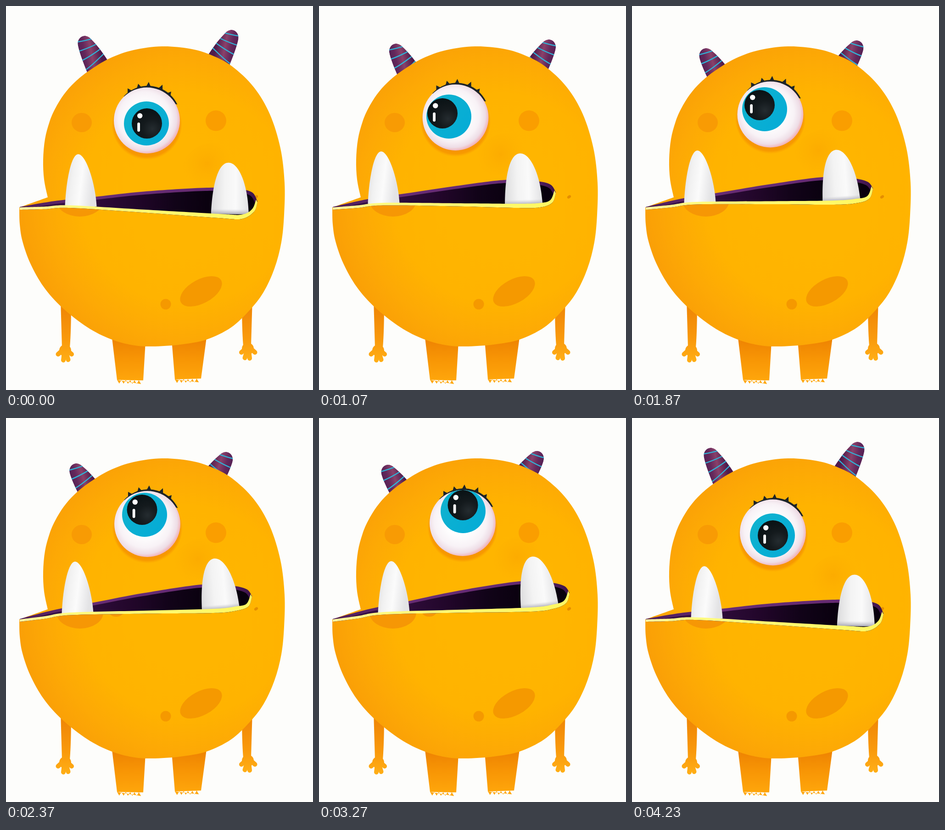
Animation of 669 by 837 pixels, one loop 4.26 s. Source, as an HTML page with a canvas:

```html
<!DOCTYPE html>
<html lang="en">
<head>
<meta charset="utf-8">
<title>Monster looking around</title>
<style>
html, body { margin: 0; width: 100%; height: 100%; overflow: hidden; background: #fdfdfb; }
canvas { display: block; width: 669px; height: 837px; }
</style>
</head>
<body>
<canvas id="stage" width="669" height="837"></canvas>
<script>
const ctx = document.getElementById('stage').getContext('2d');
const LOOP = 4260;
const TIMES = [0, 570, 1070, 1870, 2370, 3270];

// Monotone cubic track through the key poses, returning to the first one at `end`.
function track(values, end = 4150) {
  const x = [...TIMES, end], y = [...values, values[0]], n = x.length;
  const slope = i => (y[i + 1] - y[i]) / (x[i + 1] - x[i]);
  const m = y.map((_, i) => {
    if (i === 0 || i === n - 1) return 0;
    const a = slope(i - 1), b = slope(i);
    return a * b <= 0 ? 0 : 2 * a * b / (a + b);
  });
  return t => {
    if (t >= end) return y[0];
    let i = 0;
    while (t >= x[i + 1]) i++;
    const h = x[i + 1] - x[i], u = (t - x[i]) / h, v = 1 - u;
    return y[i] * v * v * (1 + 2 * u) + y[i + 1] * u * u * (3 - 2 * u)
      + h * u * v * (m[i] * v - m[i + 1] * u);
  };
}

const HORN_END = 3950;
const tracks = {
  eyeX: track([307, 304, 297.5, 301.5, 308, 313]),
  eyeY: track([249.5, 248, 243, 236.5, 231, 229]),
  irisX: track([306, 297, 283, 289, 302, 314]),
  irisY: track([256, 250, 241, 225, 211, 203]),
  pupilX: track([307, 292.5, 269, 278, 296.5, 313.5]),
  pupilY: track([256, 247, 234, 216, 200, 190]),
  hornLX: track([171, 168, 167, 160, 151.5, 148.5], HORN_END),
  hornLY: track([66, 75, 83, 93, 100, 103], HORN_END),
  hornRX: track([492, 498, 502, 491, 481, 477], HORN_END),
  hornRY: track([53, 65, 74, 76, 75, 73], HORN_END),
  hornTilt: track([24, 25, 26, 28, 29, 30], HORN_END),
  right: track([548, 532, 516, 525, 536, 546]),
  top: track([396, 387, 379, 373, 363, 356]),
  mid: track([426, 417, 406, 397, 388, 381]),
  lipL: track([434.5, 431.5, 429, 427, 424, 423]),
  lipR: track([453, 442, 431, 424, 416, 413]),
  fangX: track([157.5, 146.5, 135.5, 142.5, 150.5, 157.5]),
  fangY: track([323, 320, 317, 315, 313, 312]),
  toothX: track([488, 466, 446, 456.5, 468, 481]),
  toothY: track([451.5, 440.5, 431, 423, 415.5, 411]),
  tilt: track([0.01, -0.02, -0.035, -0.07, -0.09, -0.11])
};

// Catmull-Rom curve through points; continues the path when `join` is set.
function spline(path, pts, join) {
  path[join ? 'lineTo' : 'moveTo'](...pts[0]);
  for (let i = 0; i < pts.length - 1; i++) {
    const p = pts[i], q = pts[i + 1], a = pts[i - 1] || p, b = pts[i + 2] || q;
    path.bezierCurveTo(p[0] + (q[0] - a[0]) / 6, p[1] + (q[1] - a[1]) / 6,
      q[0] - (b[0] - p[0]) / 6, q[1] - (b[1] - p[1]) / 6, q[0], q[1]);
  }
}

function stops(g, list) {
  list.forEach(([at, color]) => g.addColorStop(at, color));
  return g;
}
const linear = (x0, y0, x1, y1, ...list) => stops(ctx.createLinearGradient(x0, y0, x1, y1), list);
const radial = (x, y, r0, r1, ...list) => stops(ctx.createRadialGradient(x, y, r0, x, y, r1), list);

function oval(x, y, rx, ry, fill, angle = 0, end = Math.PI * 2) {
  ctx.beginPath();
  ctx.ellipse(x, y, rx, ry, angle, 0, end);
  ctx.fillStyle = fill;
  ctx.fill();
}

function scoped(draw) {
  ctx.save();
  draw();
  ctx.restore();
}

const body = new Path2D();
spline(body, [[91, 417], [83, 378], [81, 335], [85, 290], [95, 252], [107, 224], [126, 193],
  [150, 166], [181, 141], [226, 114], [278, 96], [340, 88], [400, 93], [445, 106], [492, 131],
  [540, 177], [575, 236], [598, 310], [607, 385], [606, 455], [600, 515], [585, 572], [561, 624],
  [530, 664], [490, 701], [437, 727], [380, 738], [318, 742], [275, 739], [228, 726], [177, 700],
  [122, 657], [82, 612], [53, 561], [36, 513], [30, 476], [29, 441]]);
spline(body, [[29, 439], [60, 428], [91, 417]], true);
body.closePath();

const horn = new Path2D('M-27 105C-27 60-25 28-21 12C-17-5 5-8 11 12C18 30 25 55 29 105Z');
const fang = new Path2D('M-29 114C-27 62-16 0 0 0C16 0 37 60 40 114Z');
const tooth = new Path2D('M-41 2C-39-58-28-110-4-110C18-110 39-64 41 2Z');

function drawLeg(points, teeth) {
  ctx.beginPath();
  points.forEach(p => ctx.lineTo(...p));
  const [x1, y1] = points[2], [x0, y0] = points[3];
  for (let i = 1; i < teeth * 2; i++) {
    const u = i / (teeth * 2);
    ctx.lineTo(x1 + (x0 - x1) * u, y1 + (y0 - y1) * u + (i % 2 ? 8 : 0));
  }
  ctx.lineTo(x0, y0);
  ctx.fillStyle = linear(0, 730, 0, 822, [0, '#ef8502'], [0.45, '#f89605'], [1, '#ffa80c']);
  ctx.fill();
}

function drawArm() {
  const skin = linear(0, 655, 0, 775, [0, '#ef8606'], [0.6, '#f9990c'], [1, '#ffae16']);
  ctx.fillStyle = ctx.strokeStyle = skin;
  ctx.beginPath();
  ctx.moveTo(119, 640);
  ctx.quadraticCurveTo(121, 710, 122, 745);
  ctx.lineTo(139, 745);
  ctx.quadraticCurveTo(142, 710, 142, 640);
  ctx.fill();
  ctx.beginPath();
  ctx.ellipse(129, 751, 13, 13, 0, 0, 7);
  ctx.fill();
  ctx.lineWidth = 10;
  ctx.lineCap = 'round';
  for (const [x, y] of [[113.5, 759], [125, 772], [135.5, 771], [143, 759]]) {
    ctx.beginPath();
    ctx.moveTo(128, 746);
    ctx.lineTo(x, y);
    ctx.stroke();
  }
}

function drawHorn(x, y, degrees, side) {
  scoped(() => {
    ctx.translate(x, y);
    ctx.scale(side, 1);
    ctx.rotate(-degrees * Math.PI / 180);
    ctx.clip(horn);
    ctx.fillStyle = linear(-26, 0, 26, 12, [0, '#4d1c50'], [0.35, '#63285b'], [0.62, '#89416a'], [1, '#4f1b4c']);
    ctx.fill(horn);
    ctx.strokeStyle = '#2fb3d6';
    ctx.lineWidth = 2.4;
    // Stripes fan out towards the base.
    for (let i = 0; i < 4; i++) {
      const s = 8 + 17 * i, fan = 5 * i - 6;
      ctx.beginPath();
      ctx.moveTo(-28, s + fan);
      ctx.bezierCurveTo(-10, s + fan / 3 + 3, 8, s - fan / 3 + 1, 28, s - fan);
      ctx.stroke();
    }
  });
}

function drawBody() {
  ctx.fillStyle = radial(395, 420, 120, 430, [0, '#ffb500'], [0.35, '#ffb300'], [0.6, '#fda905'], [1, '#f79608']);
  ctx.fill(body);
  oval(165, 254, 22, 21, '#f89b04');
  oval(457.5, 250, 22.5, 22.5, '#fa9e00');
  oval(348, 650, 11.5, 11.5, '#f59900');
  oval(425, 622, 50, 26, '#f59900', -0.5);
  oval(545, 416, 4.5, 3, '#e58e00', -0.6);
  oval(161, 424, 51, 35, '#f69705', 0, Math.PI);
  oval(240, 422, 16, 11, '#f69705', 0, Math.PI);
}

function drawEye(k) {
  const x = k.eyeX, y = k.eyeY;
  oval(x, y + 8, 76, 78, radial(x, y + 8, 60, 78, [0, '#f58f00'], [0.65, 'rgba(246,148,0,.8)'], [1, 'rgba(250,160,0,0)']));

  ctx.fillStyle = '#1d2427';
  ctx.beginPath();
  ctx.arc(x + 2, y - 4, 71.5, -2.4, -0.45);
  ctx.fill();
  for (const [dx, dy] of [[-42, -70], [-19, -80], [4, -84], [34, -78], [53, -63]]) {
    const d = Math.hypot(dx, dy), ux = dx / d, uy = dy / d;
    ctx.beginPath();
    ctx.moveTo(x + dx, y + dy);
    ctx.lineTo(x + ux * 70 - uy * 7, y + uy * 70 + ux * 7);
    ctx.lineTo(x + ux * 70 + uy * 7, y + uy * 70 - ux * 7);
    ctx.fill();
  }

  scoped(() => {
    ctx.beginPath();
    ctx.arc(x, y, 72, 0, 7);
    ctx.clip();
    ctx.fillStyle = radial(x - 5, y - 5, 30, 79, [0, '#ffffff'], [0.55, '#f8f2f6'], [0.82, '#eedde6'], [1, '#f2adb0']);
    ctx.fillRect(x - 73, y - 73, 146, 146);
    oval(k.irisX, k.irisY, 49, 48, linear(k.irisX - 40, k.irisY - 30, k.irisX + 40, k.irisY + 30, [0, '#0fb2cf'], [1, '#05acd6']));
    const px = k.pupilX, py = k.pupilY;
    oval(px, py, 33, 33, radial(px + 12, py + 12, 0, 42, [0, '#252c30'], [0.5, '#141a1d'], [1, '#0b1316']));
    oval(px - 15.3, py - 16.7, 5.7, 5.7, '#fff');
    ctx.beginPath();
    ctx.roundRect(px - 20.8, py - 2, 5.8, 20, 3);
    ctx.fill();
  });
}

function drawMouth(k) {
  const R = k.right, T = k.top, M = k.mid, L = k.lipL, B = k.lipR;
  const N = (L + B) / 2, D = B + k.tilt * 70 + 1;
  const rise = f => 439 + (T - 439) * (f + k.tilt / 2);
  const upper = [[30, 438], [110, rise(0.33)], [200, rise(0.55)], [300, rise(0.8)],
    [R - 110, T], [R - 45, T + 2.5], [R - 12, T + 10], [R, M]];
  const edge = [[30, 439], [85, (439 + L) / 2 + 0.5], [140, L], [300, N], [R - 85, B], [R - 35, D],
    [R - 12, M + 17], [R - 3, M - 4]];
  const under = [[R, M + 2], [R - 8, M + 23], [R - 35, D + 9.5], [R - 85, B + 9], [300, N + 6.5],
    [140, L + 5.5], [85, (439 + L) / 2 + 6], [30, 444]];

  const mouth = new Path2D();
  spline(mouth, upper);
  spline(mouth, under, true);
  mouth.closePath();
  ctx.fillStyle = linear(30, 0, R, 0, [0, '#4c1c58'], [0.3, '#672c74'], [0.85, '#652a72'], [1, '#3b1248']);
  ctx.fill(mouth);
  scoped(() => {
    ctx.clip(mouth);
    ctx.translate(-4, 7);
    ctx.fillStyle = linear(30, 0, R, 0, [0, '#3d1349'], [0.3, '#300d3c'], [0.5, '#210629'], [0.66, '#110318'], [0.8, '#0a010f'], [1, '#08000d']);
    ctx.fill(mouth);
  });

  scoped(() => {
    ctx.translate(k.fangX, k.fangY);
    ctx.fillStyle = linear(-28, 0, 40, 8, [0, '#dededf'], [0.3, '#f1f1f1'], [0.6, '#fbfbfb'], [1, '#e3e3e5']);
    ctx.fill(fang);
  });
  scoped(() => {
    ctx.translate(k.toothX, k.toothY);
    ctx.rotate(k.tilt);
    ctx.fillStyle = linear(-41, 0, 41, 0, [0, '#dcdcdd'], [0.35, '#f3f3f3'], [0.65, '#fafafa'], [1, '#e2e2e4']);
    ctx.fill(tooth);
    ctx.clip(tooth);
    ctx.fillStyle = linear(0, -9, 0, 2, [0, 'rgba(185,185,195,0)'], [1, 'rgba(165,165,178,.9)']);
    ctx.fillRect(-42, -9, 84, 12);
  });

  const lip = new Path2D();
  spline(lip, edge);
  spline(lip, under, true);
  lip.closePath();
  ctx.fillStyle = linear(30, 0, R, 0, [0, '#fff9a0'], [0.2, '#fffb80'], [0.7, '#fffa6c'], [1, '#fff762']);
  ctx.fill(lip);
}

function draw(t) {
  const k = {};
  for (const name in tracks) k[name] = tracks[name](t);
  ctx.fillStyle = '#fdfdfb';
  ctx.fillRect(0, 0, 669, 837);
  drawHorn(k.hornLX, k.hornLY, k.hornTilt, 1);
  drawHorn(k.hornRX, k.hornRY, k.hornTilt, -1);
  drawLeg([[230, 715], [305, 715], [299, 816], [242, 815]], 6);
  drawLeg([[360, 715], [438, 715], [425, 812], [368, 814]], 6);
  drawArm();
  scoped(() => {
    ctx.translate(656, -4);
    ctx.scale(-1, 1);
    drawArm();
  });
  drawBody();
  const sx = k.toothX - 50, sy = k.toothY - 108;
  oval(sx, sy, 58, 42, radial(sx, sy, 0, 55, [0, 'rgba(246,150,0,.3)'], [1, 'rgba(250,165,0,0)']), -0.5);
  drawEye(k);
  drawMouth(k);
}

const start = performance.now();
function tick() {
  draw((performance.now() - start) % LOOP);
  requestAnimationFrame(tick);
}
tick();
</script>
</body>
</html>
```
